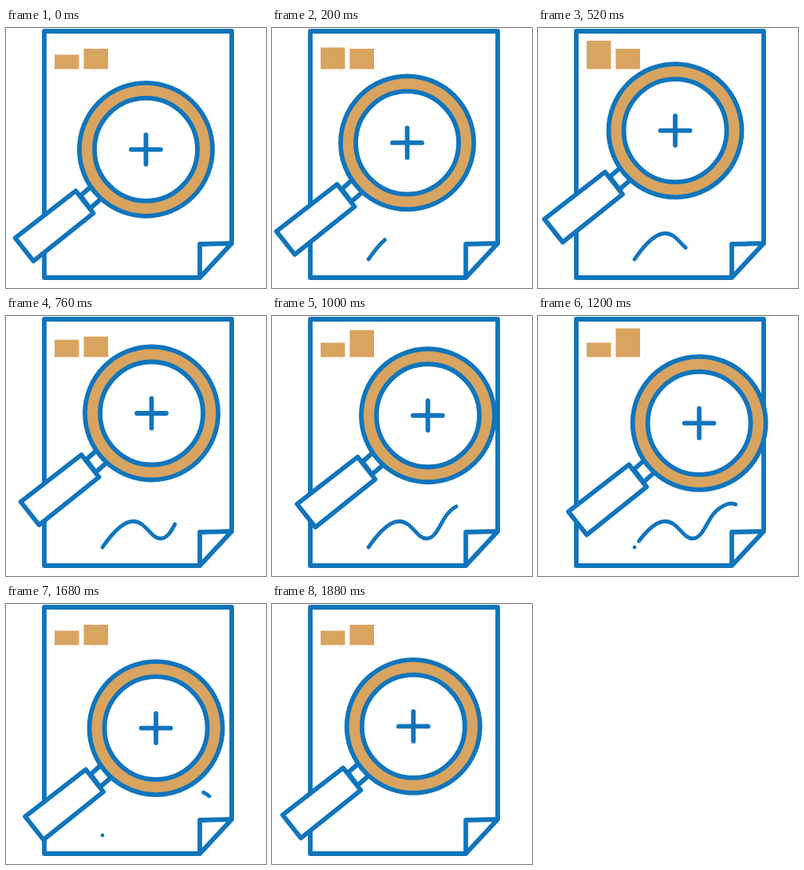
Recreate the animation shown at these times as an HTML page. Size 326 by 326 pixels, loop 1920 ms.

```html
<!DOCTYPE html>
<html lang="en">
<head>
<meta charset="utf-8">
<title>Document search</title>
<style>
  html, body { margin: 0; width: 100%; height: 100%; overflow: hidden; background: #fff; }
  svg { display: block; width: 100vw; height: 100vh; }
  .line { fill: none; stroke: #1175bc; stroke-width: 5.8; stroke-linecap: round; stroke-linejoin: round; }
  .white { fill: #fff; }
  .tan { fill: #d8a460; }
</style>
</head>
<body>
<svg viewBox="0 0 326 326">
  <path class="line" d="M48 4H283V270L243 313H48ZM283 270L243 271V313"/>
  <rect id="barA" class="tan" x="61" width="30.5"/>
  <rect id="barB" class="tan" x="97.5" width="30.5"/>
  <path id="curve" class="line" stroke-dashoffset="0" style="stroke-width:4.8"
    d="M121 290C134 271 147 257 160 257.5C176 258 181 279 194 279C209 279 212 249 230 239.5C240 233 247 234 255 241"/>
  <g id="lens">
    <path class="line white" d="M-82 58L-66 44L-53 59L-70 74Z"/>
    <path class="line white" d="M-88 52L-66 80L-141 140L-164 111Z"/>
    <circle class="line tan" r="83.5" style="fill:#d8a460"/>
    <circle class="line white" r="64.5" style="fill:#fff"/>
    <path class="line" d="M-18.5 0H18.5M0 -18.5V18.5"/>
  </g>
</svg>
<script>
const LOOP = 1920, STEP = 40, BASE = 51.5;
const [barA, barB, curve, lens] = ['barA', 'barB', 'curve', 'lens'].map(id => document.getElementById(id));
const curveLength = curve.getTotalLength();

const progress = (t, from, to) => Math.min(1, Math.max(0, (t - from) / (to - from)));
const smooth = p => (1 - Math.cos(Math.PI * p)) / 2;
const easeOut = p => p + p * (1 - p) * (0.22 + 0.62 * p);

function setBar(bar, t, low, high, [riseFrom, riseTo, fallFrom, fallTo]) {
  const grown = smooth(progress(t, riseFrom, riseTo)) - smooth(progress(t, fallFrom, fallTo));
  const top = low + (high - low) * grown;
  bar.setAttribute('y', top);
  bar.setAttribute('height', BASE - top);
}

function setCurve(t) {
  const head = easeOut(progress(t, 0, 1400)) * curveLength;
  const tail = smooth(progress(t, 1100, 1780)) * curveLength;
  const length = head - tail;
  curve.style.display = length > 0.5 ? '' : 'none';
  curve.setAttribute('stroke-dasharray', `0 ${tail} ${length} ${curveLength * 2}`);
}

// The lens circles clockwise at a slightly uneven speed.
function setLens(t) {
  const rad = Math.PI / 180, turn = t / LOOP * 360;
  const angle = (122 + turn + 5.5 * Math.cos((turn - 335) * rad)) * rad;
  lens.setAttribute('transform', `translate(${185.7 + 17 * Math.cos(angle)} ${138.7 + 17 * Math.sin(angle)})`);
}

function draw(t) {
  setBar(barA, t, 33.5, 15.5, [0, 400, 480, 880]);
  setBar(barB, t, 26, 15.5, [720, 1120, 1250, 1650]);
  setCurve(t);
  setLens(t);
}

const start = performance.now();
function tick(now) {
  const t = Math.max(0, now - start) % LOOP;
  draw(Math.floor(t / STEP) * STEP);
  requestAnimationFrame(tick);
}
draw(0);
requestAnimationFrame(tick);
</script>
</body>
</html>
```
